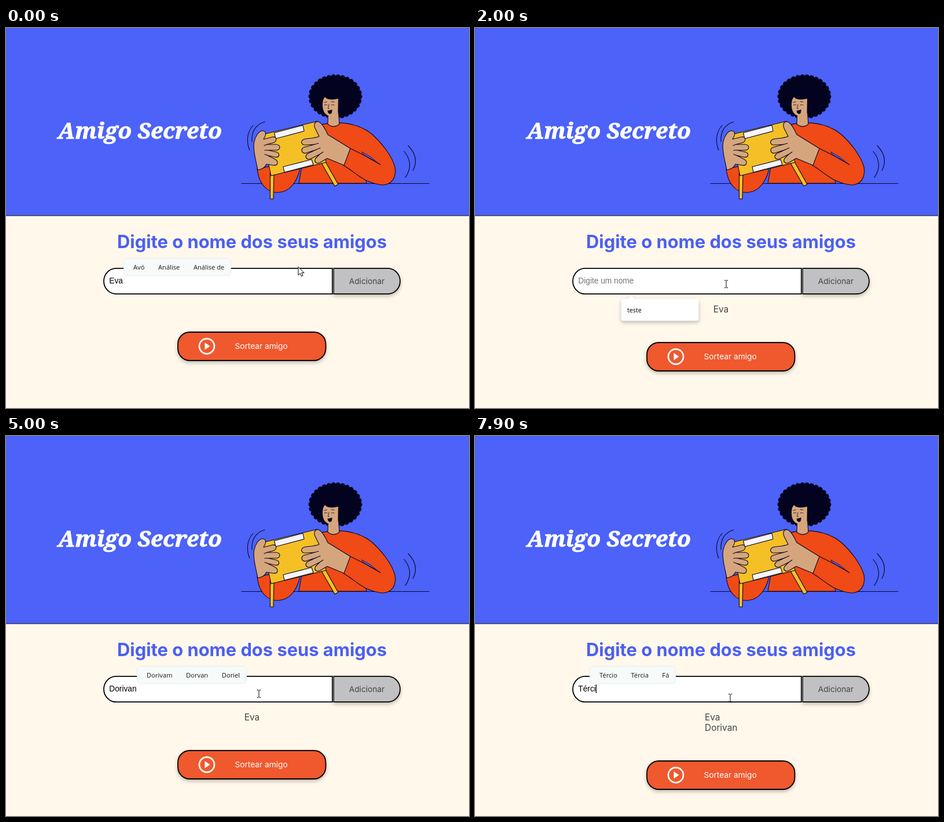
Animation, 800 px wide and 656 px high, one loop 8 s. Source, as an HTML page:

```html
<!DOCTYPE html>
<html lang="pt-BR">
<head>
<meta charset="utf-8">
<title>Amigo Secreto</title>
<style>
html, body { margin: 0; width: 100%; height: 100%; overflow: hidden; background: #fff8eb; }
#stage { position: absolute; left: 0; top: 0; width: 800px; height: 656px; overflow: hidden; }
svg { position: absolute; left: 0; top: 0; }
text { font-family: Inter, sans-serif; white-space: pre; }
.title { font: italic 700 38.9px "Noto Serif", serif; fill: #fff; stroke: #fff; stroke-width: .9; }
.heading { font-size: 30.86px; font-weight: 700; fill: #4b5ff2; }
.label { font-size: 13.7px; }
.list { font-size: 15.43px; fill: #444; }
.field { font: 13.72px "Liberation Sans", Arial, sans-serif; }
.box { stroke: #000; stroke-width: 1.8; }
.shade { filter: drop-shadow(0 3.4px 3.4px rgba(0, 0, 0, .25)); }
.art { stroke: #0a0820; stroke-width: 1.1; stroke-linejoin: round; stroke-linecap: round; }
.thin { fill: none; }
.fine { fill: none; stroke-width: .8; }
.skin { fill: #d5a67e; }
.orange { fill: #f04a16; }
.yellow { fill: #f4c026; }
.white { fill: #f5f5fa; }
#words {
  position: absolute; top: 397px; height: 31px; box-sizing: border-box;
  display: flex; align-items: center; gap: 23.5px; padding: 0 11px 0 16px;
  background: #f6faf9; border: 1px solid #e9eeeb; border-radius: 6px;
  font: 11.2px "Open Sans", "Noto Sans", sans-serif; color: #1c1c1c; white-space: nowrap;
}
#past text { font: 500 10.8px "Open Sans", "Noto Sans", sans-serif; fill: #000; }
</style>
</head>
<body>
<div id="stage">
<svg width="800" height="656" viewBox="0 0 800 656">
  <rect width="800" height="656" fill="#fff8eb"/>
  <rect width="800" height="324" fill="#4c62f9"/>
  <rect y="323.500" width="800" height="1" fill="#111"/>
  <text class="title" x="231.500" y="191" text-anchor="middle">Amigo Secreto</text>

  <g class="art">
    <path class="thin" d="M407 268.500H731"/>
    <!-- motion marks -->
    <path class="thin" d="M427 168C416 180 415 197 421 211M447 162C431 167 424 179 425 196"/>
    <path class="thin" d="M695 203Q715 224 703 246M688 213Q706 235 690 258"/>

    <!-- hair, torso and bent arm -->
    <ellipse cx="569" cy="118.500" rx="42" ry="34" fill="#04031f" stroke="#04031f" stroke-width="9" stroke-dasharray="0 8"/>
    <path class="orange" d="M540 168C570 160 606 162 632 183C649 198 667 221 672 240C675 259 666 271 650 271C640 270 631 267 622 263L623 268H506L511 240Z"/>

    <!-- neck and face -->
    <path class="skin" d="M556.500 150L556 166Q566 174 576 166L574.500 146Z"/>
    <path class="skin" stroke="none" d="M548 124C546 133 547 142 551 147C556 153 566 154 573.500 148L574 122C565 124 556 125 551 119Z"/>
    <path class="fine" d="M550 133Q552.500 131.500 555 133M562 133Q564.500 131.500 567 133M550 128.500L554.500 127.500M562 127L567 127.500M558 132L556.500 139H558.500"/>
    <path stroke="none" d="M555.500 142.500Q560 142.500 563.500 140.500Q564 148.500 559.500 148.500Q556 147.500 555.500 142.500Z" fill="#14081a"/>

    <!-- forearm lines and the gap at the elbow -->
    <path class="fine" style="fill: #4c62f9" d="M615 214L630 222.500L645 235Q629 226 618 219Z"/>
    <path class="thin" d="M595 208C613 217 632 226 647 236M583 237C598 246 610 257 622 263"/>

    <!-- far sleeve -->
    <path class="orange" d="M434 243C437 269 450 284 470 284C492 283 505 262 508 241L460 238Z"/>

    <!-- box with legs -->
    <path class="yellow" d="M456.500 250H463L462 295H456.500Z"/>
    <path class="yellow" d="M545 233L551 229L574 270L568 273Z"/>
    <path class="yellow" d="M443 184L538 161L553 232L458 255Z"/>
    <path class="white" d="M463.500 181L513 168L515 178L466 191Z"/>
    <path class="white" d="M479 239.500L528 227L531 236L481 249Z"/>

    <!-- left hand -->
    <path class="skin" d="M435 245C432 229 426 209 429 196C431 187 436 179 442 177.500C449 177 450 183 447 188L445 192L461 188C468 187 469 196 462 198L451 201L467 201C475 202 475 210 467 211L453 211L467 214C474 216 473 224 465 223L452 220L464 226C472 230 470 238 462 237L450 235C448 240 443 244 435 245Z"/>
    <path class="thin" d="M451 201L446 203M453 211L447 211M452 220L447 218"/>

    <!-- right hand -->
    <path class="skin" d="M595 208L556 184C552 175 547 166 541 162C534 160 531 166 534 173L541 187C532 191 523 190 515 192C508 195 510 202 517 202L533 201L515 206C508 209 511 217 518 216L536 210L521 217C515 222 519 228 526 226L542 218L535 225C531 232 538 236 545 231L555 225L584 237Z"/>
    <path class="thin" d="M533 201L540 199M536 210L543 207M542 218L548 214"/>
  </g>

  <text class="heading" x="425" y="380.300" text-anchor="middle">Digite o nome dos seus amigos</text>

  <path class="box" fill="#fff" d="M564 414.800V459.200H190.500A21.500 22.200 0 0 1 190.500 414.800Z"/>
  <g class="shade"><path class="box" fill="#c1c1c3" d="M566 414.800V459.200H659.500A21.500 22.200 0 0 0 659.500 414.800Z"/></g>
  <rect id="gap" x="564.800" y="414" width="0.800" height="46" fill="#c8c8c8"/>
  <text class="label" x="623.500" y="442" text-anchor="middle" fill="#444">Adicionar</text>
  <text class="field" id="typed" x="178.300" y="441"></text>
  <rect id="caret" y="429" width="1.200" height="15"/>

  <g id="people"></g>

  <g id="past">
    <g class="shade" fill="#fff"><path d="M257 467.500H264.500L270 462L275.500 467.500H382Q386.500 467.500 386.500 472V501Q386.500 505.500 382 505.500H257Q252.500 505.500 252.500 501V472Q252.500 467.500 257 467.500Z"/></g>
    <text x="263" y="490.500">teste</text>
  </g>

  <g id="draw">
    <g class="shade"><rect class="box" x="297" y="525" width="255.500" height="49" rx="20.500" fill="#f0582e"/></g>
    <circle cx="347" cy="549.300" r="13" fill="none" stroke="#fff" stroke-width="2.700"/>
    <path d="M343.500 543V555.500L352.500 549.300Z" fill="#fff"/>
    <text class="label" x="395.500" y="554" fill="#fff">Sortear amigo</text>
  </g>
</svg>
<div id="words"></div>
<svg width="800" height="656" viewBox="0 0 800 656">
  <g id="pointer" stroke="#000" stroke-linejoin="round">
    <path id="arrow" fill="#fff" d="M0 0V14L3.200 11L5.500 16L8 15L5.800 10H10Z"/>
    <path id="beam" fill="none" d="M-3 -6.500H-1L0 -5.500L1 -6.500H3M0 -5.500V5.500M-3 6.500H-1L0 5.500L1 6.500H3"/>
    <path id="hand" fill="#fff" d="M-1 0Q1 -2 2 0V6L8 7.500Q10 8 9.500 11L8 16H1L-4 10Q-4 7.500 -1 9.500Z"/>
  </g>
</svg>
</div>
<script>
const LOOP = 8000, BLINK = 500;
const $ = id => document.getElementById(id);
const show = (id, on) => { $(id).style.display = on ? "" : "none"; };

// Each row starts at its time in ms and holds until the next.
const typing = [
  [0, "Eva"], [500, ""], [2300, "D"], [2800, "Do"], [2900, "Dor"], [3000, "Dori"],
  [3200, "Doriv"], [3700, "Doriva"], [4500, "Dorivan"], [6000, ""],
  [7200, "T"], [7500, "Té"], [7600, "Tér"], [7900, "Térci"]
];
const hints = [
  [0, 203, "Avó", "Análise", "Análise de"], [300, 0],
  [2700, 190, "Mas", "Meu", "Minha"],
  [2900, 192, "Minha", "Minha mãe", "Mim"], [3200, 0],
  [3700, 222, "Doriel", "Dorvan"], [4100, 0],
  [4500, 226, "Dorivam", "Dorvan", "Doriel"], [5300, 0],
  [7600, 198, "Tércio", "Tércia", "Fá"]
];
const names = [[0], [500, "Eva"], [6000, "Eva", "Dorivan"]];
const focus = [[0, true], [400, false], [1700, true], [5600, false], [6500, true]];
const past = [[0, false], [1700, true], [2500, false], [6900, true], [7300, false]];
const caret = [[0, false], [2300, true], [4500, false], [7200, true]];
const route = [
  [0, 505, 412.5], [400, 612, 440], [500, 612, 440], [800, 521, 440], [1500, 434, 442],
  [4800, 434, 442], [5000, 437, 445], [5500, 612, 441], [5999, 612, 441],
  [6000, 455, 450], [6500, 441, 452], [LOOP, 441, 452]
];

const at = (rows, t) => rows.filter(r => r[0] <= t).pop();

function along(t) {
  const i = route.findIndex(r => r[0] > t);
  const [t0, x0, y0] = route[i - 1], [t1, x1, y1] = route[i];
  const k = (t - t0) / (t1 - t0), e = k * k * (3 - 2 * k);
  return [x0 + (x1 - x0) * e, y0 + (y1 - y0) * e];
}

function drawNames(list) {
  const many = list.length > 1;
  $("people").innerHTML = list.map((n, i) =>
    `<text class="list" x="${many ? 397 : 425}" y="${491.3 + 18 * i}" text-anchor="${many ? "start" : "middle"}">${n}</text>`).join("");
  $("draw").setAttribute("transform", `translate(0 ${18 * list.length})`);
}

function drawField(t) {
  const [since, text] = at(typing, t);
  const typed = $("typed");
  typed.textContent = text || "Digite um nome";
  typed.setAttribute("fill", text ? "#000" : "#757575");
  show("gap", at(focus, t)[1]);
  show("caret", at(caret, t)[1] && (t - since) % (2 * BLINK) < BLINK);
  $("caret").setAttribute("x", 178.3 + (text ? typed.getComputedTextLength() : 0));
}

function drawHints(t) {
  const [, x, ...words] = at(hints, t);
  show("words", x);
  $("words").style.left = x + "px";
  $("words").innerHTML = words.map(w => `<span>${w}</span>`).join("");
}

function drawPointer(t) {
  const [x, y] = along(t);
  const kind = x > 566 ? "hand" : y < 415 ? "arrow" : "beam";
  for (const k of ["arrow", "beam", "hand"]) show(k, k === kind);
  $("pointer").setAttribute("transform", `translate(${x} ${y})`);
}

let last = -1;
function tick(now) {
  const t = Math.floor(now % LOOP / 100) * 100;
  if (t !== last) {
    last = t;
    drawNames(at(names, t).slice(1));
    drawField(t);
    drawHints(t);
    show("past", at(past, t)[1]);
    drawPointer(t);
  }
  requestAnimationFrame(tick);
}
tick(0);
</script>
</body>
</html>
```
